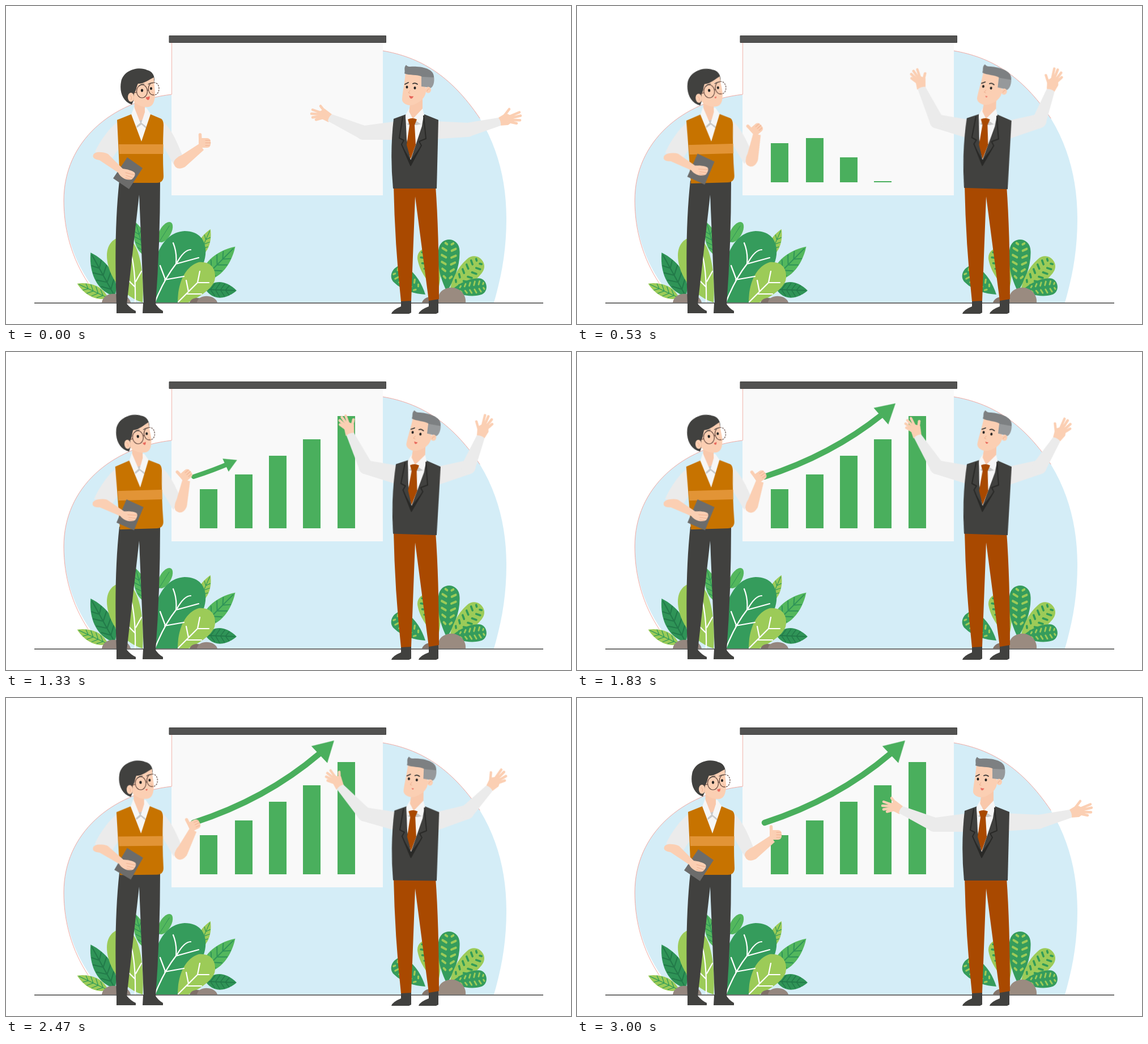
An HTML page without scripts that plays this animation: 997x561 px, repeating every 3030 ms.

```html
<!DOCTYPE html>
<html lang="en">
<head>
<meta charset="utf-8">
<title>Presentation</title>
<style>
html, body { margin: 0; width: 100%; height: 100%; overflow: hidden; background: #fff; }
svg { display: block; width: 100vw; height: 100vh; }

.lean, .lift, .wave, .bar, .shaft, .tip, .head, .mouth {
  animation: 3030ms cubic-bezier(.37, 0, .63, 1) infinite;
}
.lean { animation-name: lean; }
.lift { animation-name: lift; }
.wave { animation-name: wave; }
.mouth { animation-name: talk; }

@keyframes lean {
  0%, 92.4%, to { transform: rotate(0deg); }
  21%, 65.3% { transform: rotate(var(--a)); }
}
@keyframes lift {
  0%, 98.3%, to { transform: rotate(0deg); }
  17.5%, 80.9% { transform: rotate(var(--a)); }
}
@keyframes wave {
  0%, 98.3%, to { transform: rotate(0deg); }
  17.5%, 41.9%, 66.3% { transform: rotate(var(--up)); }
  29.7%, 54.1%, 78.5%, 80.9% { transform: rotate(var(--low)); }
}
@keyframes talk {
  0%, 32% { transform: scale(1); }
  17.5%, 82% { transform: scale(.5); }
  44% { transform: scale(.8); }
  60% { transform: scale(.7); }
  to { transform: scale(.85); }
}

/* bars rise from behind a clip edge */
.bar { transform-box: fill-box; }
.b1 { animation-name: b1; }
.b2 { animation-name: b2; }
.b3 { animation-name: b3; }
.b4 { animation-name: b4; }
.b5 { animation-name: b5; }
@keyframes b1 { 0% { transform: translateY(100%); } 17%, to { transform: translateY(0%); } }
@keyframes b2 { 0%, 5.3% { transform: translateY(100%); } 22.3%, to { transform: translateY(0%); } }
@keyframes b3 { 0%, 10.7% { transform: translateY(100%); } 27.7%, to { transform: translateY(0%); } }
@keyframes b4 { 0%, 16.2% { transform: translateY(100%); } 33.2%, to { transform: translateY(0%); } }
@keyframes b5 { 0%, 21.8% { transform: translateY(100%); } 38.8%, to { transform: translateY(0%); } }

.shaft { stroke-dasharray: 1 2; animation-name: draw; }
.tip { offset-path: path("M331 220C415 193 500 150 579 75"); offset-rotate: auto; animation-name: travel; }
.head { animation-name: swell; animation-timing-function: linear; }
@keyframes draw {
  0%, 31% { stroke-dashoffset: 1; stroke-width: 7; opacity: 0; }
  31.5% { opacity: 1; }
  67%, to { stroke-dashoffset: .12; stroke-width: 10.5; opacity: 1; }
}
@keyframes travel {
  0%, 31% { offset-distance: 0%; }
  67%, to { offset-distance: 100%; }
}
@keyframes swell {
  0%, 31% { transform: scale(0); }
  44% { transform: scale(.62); }
  60.4% { transform: scale(.95); }
  67%, to { transform: scale(1); }
}

.skin { fill: #fbcfb3; }
.neck { fill: #f9c8ab; }
.dark { fill: #41413f; }
.shirt { fill: #ebebeb; }
.white { fill: #f6f6f6; }
.grey { fill: #c9c9c9; }
.rust { fill: #a94900; }
.lime { fill: #9ccb58; color: #329c58; }
.deep { fill: #359c5c; color: #9ccb58; }
.mid { fill: #53b75d; color: #2f9457; }
.pine { fill: #2f9457; color: #227a49; }
.line { fill: none; stroke-linecap: round; stroke-linejoin: round; }
.fingers { fill: none; stroke: #fbcfb3; stroke-width: 4.5; stroke-linecap: round; }
.crease { fill: none; stroke: #eeae8e; stroke-width: 1; stroke-linecap: round; }
.red { fill: #e8665a; }
</style>
</head>
<body>
<svg viewBox="0 0 997 561" preserveAspectRatio="none">
<defs>
  <g id="leaf">
    <path d="M0 0C-24-25-22-65 0-100C22-65 24-25 0 0Z"/>
    <path class="line" stroke="currentColor" stroke-width="2.2" d="M0 0V-94M-13-30L0-16L13-30M-15-46L0-32L15-46M-14-62L0-48L14-62M-10-76L0-64L10-76"/>
  </g>
  <g id="fern">
    <path d="M0 0C-15-22-27-50-24-78C-22-106 22-106 24-78C27-50 15-22 0 0Z"/>
    <path class="line" stroke="currentColor" stroke-width="4.5" d="M-5-26l-4-3M5-26l4-3M-6-39l-7-4M6-39l7-4M-6-52l-9-4M6-52l9-4M-6-65l-10-4M6-65l10-4M-6-78l-9-4M6-78l9-4M-5-90l-4-2M5-90l4-2"/>
  </g>
  <clipPath id="floor"><path d="M292 65H665V311H292Z"/></clipPath>
</defs>

<!-- backdrop -->
<path fill="#d4edf7" d="M178 523C127 475 102 405 102 343C102 239 186 168 292 156L400 100L665 79C730 90 785 122 836 198C868 250 883 310 883 375C883 430 875 475 861 523"/>
<path class="line" stroke="#f0aaa3" stroke-width="1" d="M145 489C116 445 102 395 102 343C102 239 186 168 292 156M665 79C730 90 785 122 836 198"/>
<path fill="#f9f9f9" d="M292 60H665V334H292Z"/>
<path stroke="#f0b5ad" d="M292.500 65V156"/>
<path fill="#525251" stroke="#414140" d="M288 52.500H670.500V64.500H288Z"/>

<!-- left plants -->
<use href="#leaf" class="mid" transform="translate(246 442)rotate(-16)scale(.63)"/>
<ellipse class="mid" cx="281" cy="399" rx="10" ry="20" transform="rotate(30 281 399)"/>
<path class="line" stroke="#2f9457" d="M268 420L288 388"/>
<use href="#leaf" class="lime" transform="translate(338 445)rotate(24)scale(.56)"/>
<use href="#leaf" class="mid" transform="translate(343 486)rotate(45)scale(.9 .87)"/>
<use href="#leaf" class="pine" transform="translate(352 500)rotate(92)scale(.8 .55)"/>
<use href="#leaf" class="pine" transform="translate(192 512)rotate(-29)scale(.95 .88)"/>
<use href="#leaf" class="lime" transform="translate(180 515)rotate(-65)scale(.6)"/>
<path class="lime" d="M241 523C200 510 178 470 178 440C178 413 200 402 218 411C238 425 244 480 241 523Z"/>
<path class="deep" d="M254 523C254 470 265 400 315 397C352 397 358 430 348 455C338 485 320 500 312 523Z"/>
<path class="lime" d="M303 523C303 490 315 460 340 452C365 450 372 468 368 485C360 505 330 518 322 523Z"/>
<g class="line" stroke="#fff" stroke-width="2.200">
  <path d="M228 522Q229 470 221 438M228 496L215 483M229 486L239 468"/>
  <path d="M263 522Q280 480 300 455Q302 435 295 418M301 454Q314 430 326 430M300 455L340 444M281 482L272 458M280 483L314 477"/>
  <path d="M304 522L338 488L342 468M338 488L358 488M322 504L318 484M319 508L345 508"/>
</g>
<path fill="#95877f" d="M169 523C172 508 188 506 197 509C210 508 218 514 220 523Z"/>
<path fill="#7f7068" d="M324 523C328 513 340 514 347 517L350 523Z"/>
<path fill="#95877f" d="M337 523C339 508 368 508 373 523Z"/>

<!-- right plants -->
<use href="#fern" class="lime" transform="translate(762 503)rotate(-17)scale(.75 .8)"/>
<use href="#fern" class="deep" transform="translate(740 509)rotate(-52)scale(.72)"/>
<use href="#fern" class="deep" transform="translate(778 504)rotate(3)scale(.78 .93)"/>
<use href="#fern" class="lime" transform="translate(782 505)rotate(44)scale(.75 .82)"/>
<use href="#fern" class="deep" transform="translate(785 502)rotate(82)scale(.62 .64)"/>
<path fill="#85766c" d="M734 523C738 512 755 510 770 514L780 523Z"/>
<path fill="#9a8b80" d="M764 523C758 505 775 495 790 497C805 500 812 512 811 523Z"/>

<path stroke="#41413f" stroke-width="1.600" d="M50 524H948"/>

<!-- chart -->
<g fill="#4aaf5d">
  <g clip-path="url(#floor)">
    <path class="bar b1" d="M342 242h31v69h-31Z"/>
    <path class="bar b2" d="M404 216h31v95h-31Z"/>
    <path class="bar b3" d="M464 183h31v128h-31Z"/>
    <path class="bar b4" d="M524 154h31v157h-31Z"/>
    <path class="bar b5" d="M585 113h31v198h-31Z"/>
  </g>
  <path class="line shaft" stroke="#4aaf5d" pathLength="1" d="M331 220C415 193 500 150 579 75"/>
  <g class="tip"><path class="head" d="M0 0L-36-20.500V20.500Z"/></g>
</g>

<!-- left presenter -->
<path class="dark" d="M195 524H212Q220 534 229 538V542H195ZM242 524H263Q268 533 277 538V542H241Z"/>
<path class="dark" d="M200 308H272Q272 420 264 527H243L235 333L213 527H195Q190 400 200 308Z"/>
<g class="lean" style="--a:-1.7deg;transform-origin:238px 312px">
  <path class="shirt" d="M199 203C182 215 166 238 157 257L188 268L203 246Z"/>
  <path class="shirt" d="M273 201C290 212 302 240 311 263L296 280L276 244Z"/>
  <path class="white" d="M221 192L227 178L248 180L256 192L239 240Z"/>
  <path class="grey" d="M228 203L238 200L250 203L247 216L239 209L231 215Z"/>
  <path class="neck" d="M227 165L226 190Q236 212 245 194L245 172Z"/>
  <path class="white" d="M221 192L226 178L237 206L230 212ZM256 192L247 181L239 206L248 213Z"/>
  <path fill="#c77300" d="M196 201L221 191L239 239L255 191L274 199Q278 202 278 210Q276 260 278 300Q278 312 266 312H201Q199 260 196 201Z"/>
  <path fill="#e29436" d="M199 244H277.500V261H200Z"/>

  <g class="lean" style="--a:-3.8deg;transform-origin:238px 186px">
    <path class="dark" d="M222 174C205 168 200 150 203 134C207 112 235 106 249 113C262 116 264 130 260 137L230 155Z"/>
    <path class="skin" d="M226 154C230 150 230 142 233 137C242 138 252 130 261 126C261 140 264 152 263 158C262 168 260 176 252 178C240 180 228 172 225 167Z"/>
    <ellipse class="skin" cx="220.500" cy="161" rx="5.500" ry="8"/>
    <path class="crease" d="M219 158Q223 160 221 165M258 152l3 4l-3 1"/>
    <g class="line" stroke="#5b4139" stroke-width="1.200">
      <ellipse cx="240" cy="150.500" rx="9.500" ry="11.500"/>
      <path d="M261 135C248 135 248 157 261 157M249.500 149L251.500 148M230.500 152L224 154"/>
      <path stroke-dasharray="2 2.500" d="M261 135C273 135 273 157 261 157"/>
      <path stroke="#41413f" d="M235 141Q239 137 244 138M251 138Q255 135 259 136"/>
    </g>
    <ellipse cx="240" cy="149" rx="2.100" ry="2.700" fill="#222"/>
    <ellipse cx="256" cy="145.500" rx="2" ry="2.600" fill="#222"/>
    <path class="red mouth" style="transform-origin:250px 162px" d="M246.500 161Q250 161 253.500 159Q254 165 250.500 166Q247.500 165 246.500 161Z"/>
  </g>

  <g class="lean" style="--a:-9deg;transform-origin:165px 262px">
    <path fill="#6c6c6b" d="M214 267L241 286L217 323L189 304Z"/>
    <path class="skin" d="M154 263C156 256 170 257 180 261L206 287C214 288 222 290 227 294C229 299 226 302 222 306C213 308 203 304 198 294L165 272C157 271 152 268 154 263Z"/>
    <path class="crease" d="M211 294L227 298M212 299L224 303M211 303L219 306"/>
  </g>
  <g class="wave" style="--up:-40deg;--low:-25deg;transform-origin:305px 273px">
    <path class="skin" d="M296 277C298 290 312 288 318 282L349 254L341 243L310 263C303 266 296 271 296 277Z"/>
    <path class="fingers" style="stroke-width:5.500" d="M343 241L342.500 227"/>
    <rect class="skin" x="340" y="233" width="21" height="17" rx="6"/>
    <path class="crease" d="M352 237H360M352 241.500H361M352 246H359"/>
  </g>
</g>

<!-- right presenter -->
<path class="dark" d="M697 518H715V541L711 543H680Q682 536 697 530ZM746 517H763V541L759 543H728Q730 536 746 530Z"/>
<path class="rust" d="M684 317H758Q764 400 764 517L746 520L722 336L715 520L697 521Q686 420 684 317Z"/>
<g class="lean" style="--a:1.9deg;transform-origin:722px 321px">
  <g class="lift" style="--a:15.5deg;transform-origin:695px 218px">
    <path class="shirt" d="M692 203L632 211L628 236L692 236Z"/>
    <g class="wave" style="--up:24deg;--low:8deg;transform-origin:630px 223.500px">
      <g class="lift" style="--a:11deg;transform-origin:572px 197px">
        <path class="skin" d="M575 191L562 181L552 187L553 197L569 205Z"/>
        <path class="fingers" d="M564 188L555 176.500M558 189L541 183M557 191L539 190M557 194L541 196.500M560 197L547 200.500"/>
      </g>
      <path class="shirt" d="M633 211L575 191Q569 196 568 203L626 235Z"/>
      <circle class="shirt" cx="630" cy="223.500" r="12.500"/>
    </g>
  </g>
  <g class="lift" style="--a:-17deg;transform-origin:752px 219px">
    <path class="shirt" d="M752 203L815 206V231L752 235Z"/>
    <g class="wave" style="--up:-40deg;--low:-16deg;transform-origin:815px 218.500px">
      <path class="skin" d="M869 197L882 189L893 194L894 204L886 210L872 211Z"/>
      <path class="fingers" d="M878 195L888 182M888 195L906 187.500M889 198L908 193.500M888 201L907 201.500M887 204L901 207"/>
      <path class="shirt" d="M814 206L869 197Q874 204 873 211L816 231Z"/>
      <circle class="shirt" cx="815" cy="218.500" r="12.500"/>
    </g>
  </g>
  <path class="dark" d="M684 199L706 191H738L763 201L760 322H683Q677 260 684 199Z"/>
  <path class="white" d="M705 192L712 180L733 180L737 192L734 212L714 272L707 235Z"/>
  <path class="grey" d="M706 207L712 199H730L734 208L725 210H710Z"/>
  <path class="neck" d="M714 166L711 188L718 201L735 184L735 158Z"/>
  <path class="white" d="M710 184L705 195L707 209L718 199ZM735 181L738 192L733 209L718 199Z"/>
  <path class="rust" d="M709 200Q717 196 725 200L721 210L723 245L714 270L707 245L712 210Z"/>
  <path class="line" stroke="#292927" stroke-width="2" d="M700 196L694 233L702 237L698 244L714 281L733 246L729 239L741 234L737 194"/>
  <path fill="#292927" d="M697 243L714 272L734 245L714 283Z"/>

  <g class="lean" style="--a:5deg;transform-origin:722px 190px">
    <path class="skin" d="M705 117C703 140 699 155 699 166C701 174 712 177 720 174C735 168 741 158 741 150L738 120Z"/>
    <path fill="#96999b" d="M733 123L755 124C757 135 753 145 748 145L742 143L733 142Z"/>
    <ellipse class="skin" cx="745" cy="148" rx="5" ry="5.500"/>
    <path class="crease" d="M743 150Q744 146 747 146M713 149l-3 4l3 1"/>
    <path fill="#7d8082" d="M703 119C705 114 701 109 706 104C710 109 715 106 725 107C742 108 756 114 755 126L735 125C725 120 712 123 703 119Z"/>
    <path class="line" stroke="#333" stroke-width="1.700" d="M704 138L710 135M718 137Q722 135 726 138"/>
    <ellipse cx="707.500" cy="143" rx="2" ry="2.500" fill="#222"/>
    <ellipse cx="721.500" cy="144.500" rx="2" ry="2.500" fill="#222"/>
    <path class="red mouth" style="transform-origin:715px 160px" d="M711.500 158Q715 160 719 159Q718 163.500 714.500 163.500Q711.500 162 711.500 158Z"/>
  </g>
</g>
</svg>
</body>
</html>
```
